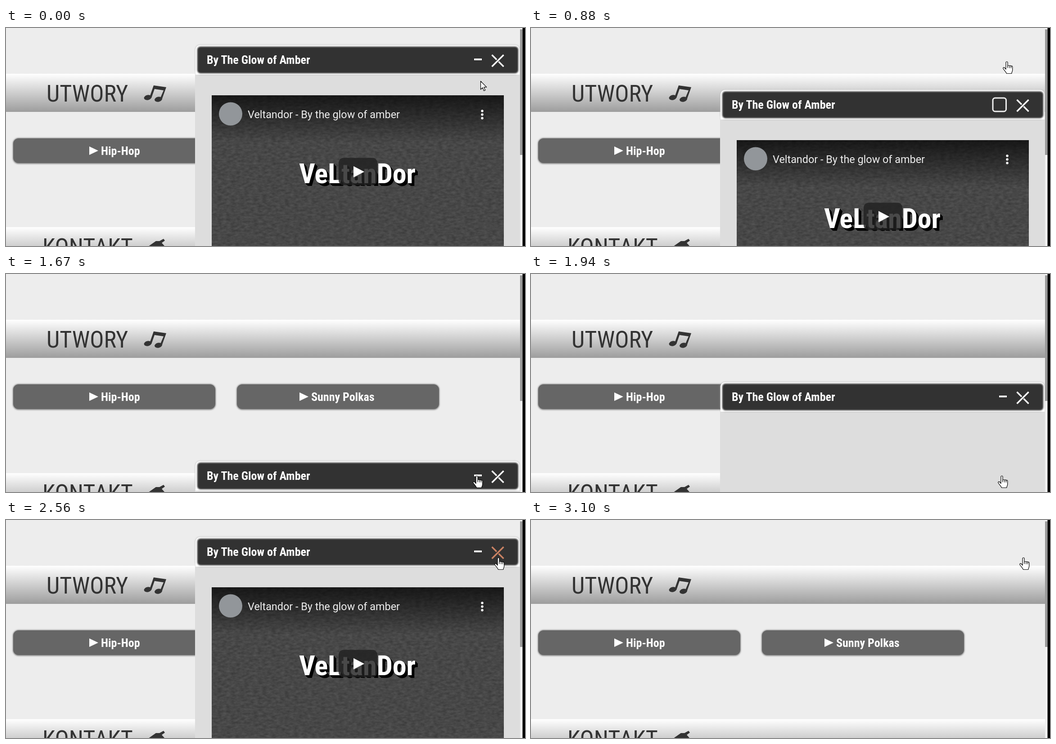
These frames come from a looping animation (1153x486 px, 3660 ms). An HTML page:

```html
<!DOCTYPE html>
<html lang="pl">
<head>
<meta charset="utf-8">
<title>Utwory</title>
<style>
  html, body { margin: 0; width: 100%; height: 100%; overflow: hidden; background: #ededed; }
  svg { display: block; width: 1153px; height: 486px; }
  .narrow { font-family: "Roboto Condensed", Roboto, "Liberation Sans", sans-serif; font-stretch: 75%; }
  .squeeze .narrow { transform: scaleX(.87); transform-box: fill-box; transform-origin: left; }
  .heading { font-size: 52px; fill: #333; }
  .bold { font-size: 26px; font-weight: 700; fill: #fff; }
  .clip-title { font: 23.4px Roboto, "Liberation Sans", sans-serif; fill: #eee; }
  .wordmark { font-size: 62px; font-weight: 700; fill: #fff;
    filter: drop-shadow(1px 1px 0 #000) drop-shadow(2px 2px 0 #000) drop-shadow(3px 3px 0 #000); }
  .pointer path { fill: #fff; stroke: #000; stroke-width: 1.2; stroke-linejoin: round; }
  .pointer .crease { fill: none; }
</style>
</head>
<body>
<svg id="stage" viewBox="0 0 1153 486">
  <defs>
    <linearGradient id="bar" x2="0" y2="1">
      <stop offset="0" stop-color="#fff"/>
      <stop offset="1" stop-color="#9d9d9d"/>
    </linearGradient>
    <linearGradient id="shade" x2="0" y2="1">
      <stop offset="0" stop-color="#000" stop-opacity=".68"/>
      <stop offset=".45" stop-color="#000" stop-opacity=".38"/>
      <stop offset="1" stop-color="#000" stop-opacity="0"/>
    </linearGradient>
    <filter id="soft" x="-5%" y="-15%" width="110%" height="130%"><feGaussianBlur stdDeviation="1.4"/></filter>
    <filter id="stone" x="0" y="0" width="1" height="1" color-interpolation-filters="sRGB">
      <feTurbulence type="fractalNoise" baseFrequency=".1 .2" numOctaves="3" seed="4"/>
      <feColorMatrix values=".13 0 0 0 .215  .13 0 0 0 .215  .13 0 0 0 .215  0 0 0 0 1"/>
    </filter>
    <g id="button">
      <rect x="-1" y="-1" width="451" height="58" rx="13" fill="#888" filter="url(#soft)"/>
      <rect width="449" height="55" rx="12" fill="#666"/>
    </g>
    <path id="play" d="M0 0 20 9.5 0 19z" fill="#fff"/>
  </defs>

  <rect width="1153" height="486" fill="#ededed"/>

  <rect y="102" width="1142" height="85" fill="url(#bar)"/>
  <text class="narrow heading" x="90" y="164">UTWORY</text>
  <g fill="#333">
    <ellipse cx="315" cy="155" rx="8.5" ry="5.5" transform="rotate(-12 315 155)"/>
    <ellipse cx="338.5" cy="159" rx="8.5" ry="5.5" transform="rotate(-12 338.5 159)"/>
    <path d="M319 154 328 128 356 132 346 160 342 158 350 139 330 136 323 156z"/>
  </g>

  <use href="#button" x="16" y="246"/>
  <use href="#play" x="185" y="264"/>
  <text class="narrow bold" x="211" y="283">Hip-Hop</text>
  <use href="#button" x="513" y="246"/>
  <use href="#play" x="652" y="264"/>
  <text class="narrow bold" x="678" y="283">Sunny Polkas</text>

  <rect y="444" width="1142" height="85" fill="url(#bar)"/>
  <text class="narrow heading" x="81" y="506">KONTAKT</text>
  <path d="M316 487 333 475 341 475 350 470 353 474 346 479 353 487z" fill="#333"/>

  <g id="panel">
    <rect x="420" y="100" width="722" height="600" fill="#ddd"/>
    <rect x="420.5" y="37.5" width="721" height="67" rx="10" fill="#c4c4c4" filter="url(#soft)"/>
    <path d="M421 104V48a10 10 0 0 1 10-10H1131a10 10 0 0 1 10 10V104z" fill="#fff"/>
    <rect x="425" y="41.5" width="713" height="59.5" rx="7" fill="#333" filter="url(#soft)"/>
    <text id="title" class="narrow bold" x="446" y="80">By The Glow of Amber</text>
    <rect id="minus" x="1040" y="68" width="17" height="4" fill="#fff"/>
    <rect id="square" x="1026" y="56" width="29.5" height="30" rx="5" fill="none" stroke="#eee" stroke-width="3"/>
    <path id="cross" d="M1079.5 86 1105.5 60M1079.5 60 1090 70.5M1094.500 75 1105.5 86" fill="none" stroke-width="3.4"/>

    <g id="video">
      <rect x="457" y="150" width="649" height="365" filter="url(#stone)"/>
      <rect x="457" y="150" width="649" height="105" fill="url(#shade)"/>
      <circle cx="499" cy="191.5" r="26" fill="#92969a"/>
      <text class="clip-title" x="537" y="201">Veltandor - By the glow of amber</text>
      <g fill="#fff">
        <circle cx="1058" cy="185" r="2.7"/>
        <circle cx="1058" cy="193" r="2.7"/>
        <circle cx="1058" cy="201" r="2.7"/>
      </g>
      <text class="narrow wordmark" x="651" y="346">VeLtanDor</text>
      <g id="idle">
        <rect x="739" y="289.5" width="86" height="61" rx="11" fill="#212121" fill-opacity=".82"/>
        <path d="M772 308 796 320.5 772 333z" fill="#fff"/>
      </g>
      <rect id="hot" x="738" y="289.5" width="87" height="61" rx="11" fill="#f00"/>
    </g>
  </g>

  <rect x="1142" width="6" height="486" fill="#f1f1f1"/>
  <rect x="1142" y="3" width="5.5" height="280" fill="#999"/>
  <rect x="1147.5" width="5.5" height="486" fill="#000"/>

  <g id="pointer" class="pointer">
    <path id="arrow" d="M.5.5V19l4.2-4 3 7 3-1.3-3-6.8h6z"/>
    <g id="hand" transform="translate(-10 0)">
      <path d="M7 18V3a2 2 0 0 1 4 0v8c0-2 4-2 4 0 0-1.5 3.5-1.5 3.5.5 0-1.5 3.2-1 3.2 1v7c0 4-2 5-2 8H8.5C8 25 3 20 1 16.5c-1-2 1.5-3.5 3-2z"/>
      <path class="crease" d="M11 11v4M15 11.5v4M18.5 12v3.5"/>
    </g>
  </g>
</svg>
<script>
  const LOOP = 3660, FIRST = 180, STEP = 69.5;
  const LOW = 381, OUT = 449;
  const $ = id => document.getElementById(id);

  // Pointer tip: step, x, y
  const trail = [
    [0, 1054, 118], [1, 1055, 116], [3, 1061, 104], [5, 1061, 88], [7, 1058, 75], [8, 1058, 74],
    [12, 1058, 74], [13, 1054, 95], [14, 1050, 140], [15, 1045, 202], [16, 1043, 290],
    [17, 1044, 380], [18, 1046, 425], [19, 1047, 446], [20, 1047, 449], [26, 1047, 449],
    [27, 1052, 440], [28, 1070, 400], [29, 1088, 335], [30, 1096, 274], [31, 1098, 190],
    [32, 1097, 120], [33, 1096, 95], [34, 1095, 83], [60, 1095, 83]
  ];

  const during = (k, from, to) => k >= from && k < to;
  const show = (id, on) => { $(id).style.display = on ? '' : 'none'; };
  const swing = (k, from, span) => {
    const p = Math.min(1, Math.max(0, (k - from) / span));
    return (1 - Math.cos(p * Math.PI)) / 2;
  };

  function tip(k) {
    const i = trail.findIndex(p => p[0] > k);
    const [k0, x0, y0] = trail[i - 1], [k1, x1, y1] = trail[i];
    const u = (k - k0) / (k1 - k0);
    return [x0 + (x1 - x0) * u, y0 + (y1 - y0) * u];
  }

  function draw(t) {
    const k = t < FIRST + 10 ? 0 : 1 + Math.floor((t - FIRST) / STEP);

    const closing = swing(k, 37.28, 5.5);
    const drop = LOW * (swing(k, 8.54, 7.2) - swing(k, 21.52, 9.35)) + OUT * closing;
    $('panel').setAttribute('transform', `translate(0 ${Math.round(drop)})`);
    $('panel').setAttribute('opacity', 1 - closing);
    show('panel', k < 43);
    show('title', k < 38);

    const minimised = during(k, 9, 22);
    show('square', minimised);
    show('minus', !minimised);
    $('cross').setAttribute('stroke', k >= 34 ? '#ca8263' : '#fff');

    const hot = during(k, 29, 32);
    show('video', !during(k, 22, 28));
    show('hot', hot);
    show('idle', !hot);

    const hand = during(k, 5, 12) || during(k, 19, 27) || hot || k >= 33;
    show('hand', hand);
    show('arrow', !hand);
    $('pointer').setAttribute('transform', `translate(${tip(k).map(Math.round)})`);
  }

  // Condense the lettering evenly where no narrow face exists
  function checkFont() {
    const probe = $('title'), narrow = probe.getComputedTextLength();
    probe.style.fontFamily = 'Roboto, "Liberation Sans", sans-serif';
    probe.style.fontStretch = 'normal';
    const normal = probe.getComputedTextLength();
    probe.removeAttribute('style');
    $('stage').classList.toggle('squeeze', normal - narrow < 2);
  }

  checkFont();
  const start = performance.now();
  function tick() {
    draw((performance.now() - start) % LOOP);
    requestAnimationFrame(tick);
  }
  tick();
</script>
</body>
</html>
```
